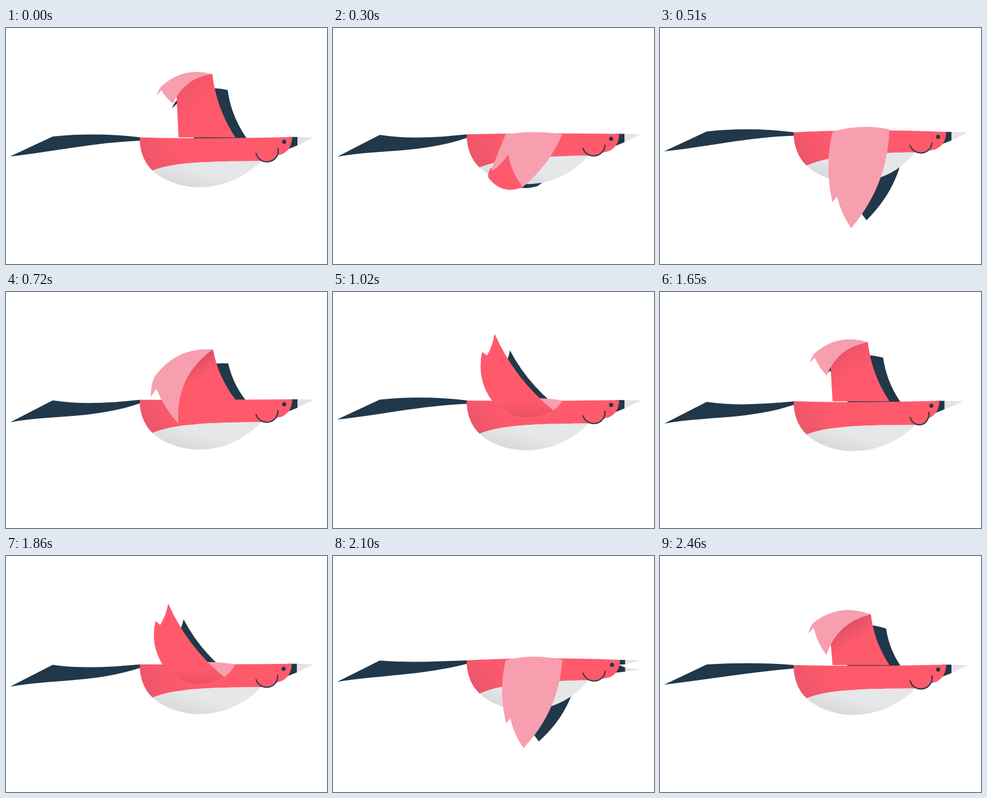
Write an HTML page that moves like this. It is 543x398 px and loops after 2.49 s.

```html
<!DOCTYPE html>
<html lang="en">
<head>
<meta charset="utf-8">
<title>Flying bird</title>
<style>
  html, body { margin: 0; width: 100%; height: 100%; overflow: hidden; background: #fff; }
  svg { display: block; width: 100%; height: 100%; }
  .red { fill: #ff5a6c; }
  .pale { fill: #f79fae; }
  .navy { fill: #21384a; }
  .beak { fill: #e4e2e8; }
</style>
</head>
<body>
<svg viewBox="0 0 543 398">
  <defs>
    <linearGradient id="rump" gradientUnits="userSpaceOnUse" x1="230" y1="52" x2="290" y2="14">
      <stop stop-color="#e9546a"/><stop offset="1" stop-color="#ff5a6c"/>
    </linearGradient>
    <linearGradient id="vent" gradientUnits="userSpaceOnUse" x1="318" y1="86" x2="326" y2="56">
      <stop stop-color="#d8d9dc"/><stop offset="1" stop-color="#e6e7e8"/>
    </linearGradient>
    <linearGradient id="fold" x1="0.1" y1="0" x2="0.5" y2="0.5">
      <stop offset="0.2" stop-color="#cc485e"/><stop offset="1" stop-color="#ff5a6c"/>
    </linearGradient>
    <linearGradient id="under" x1="0" y1="0" x2="0" y2="1">
      <stop offset="0.8" stop-color="#ff5a6c"/><stop offset="1" stop-color="#e94f64"/>
    </linearGradient>
  </defs>
  <g id="farWing" class="navy"><path id="farInner"/><path id="farOuter"/></g>
  <path id="tail" class="navy"/>
  <g id="bird">
    <path id="mask" class="navy"/>
    <path id="bill" class="beak"/>
    <path id="torso" fill="url(#rump)"/>
    <path id="belly" fill="url(#vent)"/>
    <path id="smile" class="red" stroke="#21384a" stroke-width="2" stroke-linecap="round"/>
    <circle id="eye" class="navy" r="3.5"/>
  </g>
  <path id="inner"/>
  <path id="innerShade" fill="url(#fold)"/>
  <path id="outer"/>
  <path id="outerShade" fill="url(#under)"/>
</svg>
<script>
const LOOP = 2490, BEAT = LOOP / 3, STEP = 30;
const TOP = 75;              // phase with the wing fully raised
const KEYS = 7, DOWN = 3;    // equal parts of a beat, and how many are downstroke

const el = {};
document.querySelectorAll('svg [id]').forEach(n => el[n.id] = n);
const set = (node, attrs) => { for (const k in attrs) node.setAttribute(k, attrs[k]); };

const mix = (a, b, k) => a + (b - a) * k;
const mixPt = (a, b, k) => [mix(a[0], b[0], k), mix(a[1], b[1], k)];
const clamp = v => Math.max(0, Math.min(1, v));
const ease = v => { v = clamp(v); return v * v * (3 - 2 * v); };
const bump = (t, mid, width) => Math.exp(-(((t - mid) / width) ** 2));

// point at place u on a polyline whose vertices are one unit of time apart
function follow(path, u) {
  const i = Math.min(Math.floor(u), path.length - 2);
  return mixPt(path[i], path[i + 1], u - i);
}

// closed outline of [point, bend] pairs; bend curves the edge to the next point
function outline(...edges) {
  let d = 'M' + edges[0][0];
  edges.forEach(([a, bend], i) => {
    const b = edges[(i + 1) % edges.length][0];
    const [mx, my] = mixPt(a, b, 0.5);
    d += `Q${mx + bend * (b[1] - a[1])} ${my - bend * (b[0] - a[0])} ${b}`;
  });
  return d + 'Z';
}

// both feather tips run round a closed track
const longTip = [[285, 28], [273, 72], [299, 229], [322, 322], [324, 345], [300, 251], [281, 185]];
const shortTip = [[266, 72], [252, 102], [270, 250], [293, 281], [291, 300], [242, 207], [249, 138]];
// the crease travels from the shoulder to the tips once per stroke
const frontDown = [[372, 200], [315, 276]], rearDown = [[268, 183], [262, 260]];
const frontUp = [[388, 168], [342, 88], [360, 108], [330, 26]];
const rearUp = [[292, 174], [245, 163], [259, 118], [268, 66]];

function drawWings(phase, y) {
  const u = (phase - TOP + BEAT) % BEAT / BEAT * KEYS;
  const down = u < DOWN;
  const tip = follow([...longTip, longTip[0]], u);
  const tip2 = follow([...shortTip, shortTip[0]], u);
  const rootF = [388, y], rootR = [292, y];
  const crease = (root, fall, rise, end) =>
    down ? follow([root, ...fall, end], u) : follow([root, ...rise], u - DOWN);
  const front = crease(rootF, frontDown, frontUp, tip);
  const rear = crease(rootR, rearDown, rearUp, tip2);

  // notch between the feathers, pulled towards the crease
  const base = mixPt(tip2, tip, 0.3);
  const span = Math.hypot(tip[0] - tip2[0], tip[1] - tip2[1]);
  const reach = Math.hypot(rear[0] - base[0], rear[1] - base[1]) || 1;
  const notch = mixPt(base, rear, Math.min(0.7, 0.42 * span / reach));

  const roll = down ? 0 : ease((u - DOWN - 0.6) / 1.4);
  const lead = down ? 0.12 : mix(0.18, -0.28, roll);
  const ridge = down ? -0.38 : mix(0.12, 0.28, roll);
  const corner = down ? rear : mixPt(rootR, [288, mix(front[1], tip[1], 0.55)], roll);

  const inner = outline([rootR, 0], [corner, down ? ridge : 0.32 * roll], [front, -0.12], [rootF, down ? -0.08 : 0]);
  const outer = outline([front, lead], [tip, 0.1], [notch, 0], [tip2, down ? -0.22 : 0.12], [rear, ridge]);
  const folded = roll * clamp((6.5 - u) * 2);
  const cupped = down ? clamp(1 - Math.abs(u - 1) * 1.3) : 0;

  set(el.inner, { d: inner, class: down ? 'pale' : 'red' });
  set(el.outer, { d: outer, class: down ? 'red' : 'pale' });
  set(el.innerShade, { d: inner, opacity: folded });
  set(el.outerShade, { d: outer, opacity: cupped });
  set(el.farInner, { d: inner });
  set(el.farOuter, { d: outer });
  set(el.farWing, { transform: `matrix(1 0 0 0.85 26 ${0.15 * y + 11})` });
}

function drawTail(t, y) {
  const wave = ((1 + Math.cos(2 * Math.PI * (t - 10) / (LOOP / 5))) / 2) ** 3;
  const h = (rest, swing) => y + rest - swing * wave;
  set(el.tail, { d: `M228 ${y}C178 ${h(5, 11)} 130 ${h(9, 16)} 79 ${h(1, 2.5)}` +
    `L7 ${h(38, 6)}C75 ${h(25, 0)} 150 ${h(33, 25)} 228 ${y + 5.5}Z` });
}

function drawBody(t, y, sway) {
  const nod = bump(t, 1650, 130);
  const open = ease((t - 1930) / 80) * ease((2280 - t) / 80);
  const dx = 1.5 * open - 11.5 * nod;
  const x = v => v + dx;
  const gap = 5.5 * open, chin = 37 + 0.7 * sway, end = 460 + dx * 0.45;
  const billX = 521 + dx * 0.7;
  set(el.bird, { transform: `translate(0 ${y})` });
  set(el.torso, { d: `M226 0Q345 ${sway * 1.1 - 1.5} ${x(484)} -0.8C${x(484)} 17 ${x(474)} 28 ${x(460)} 30` +
    `L432 ${chin}C330 ${chin} 280 43 248 56C233 42 226 22 226 0Z` });
  set(el.belly, { d: `M248 56C280 43 330 ${chin} 432 ${chin}C405 66 370 84 325 84C293 84 262 70 248 56Z` });
  set(el.mask, { d: `M${x(478)} -0.8H${x(493)}V6.5L${x(481)} 7.5L${x(493)} ${6.5 + gap}V${13.5 + gap}L${x(474)} 21Z` });
  set(el.bill, { d: `M${x(493)} -0.8L${billX} 0L${x(493)} 6.5Z` +
    `M${x(493)} ${mix(-0.8, 12, open)}L${billX} ${15.5 * open}L${x(493)} ${13.5 + gap}Z` });
  set(el.smile, { d: `M423 ${24.5 + 0.6 * sway}A${(end - 422) / 2} 18.6 0 0 0 ${end} 18.3` });
  set(el.eye, { cx: x(470.5), cy: 7.5 });
}

function draw(ms) {
  const t = Math.floor((ms % LOOP) / STEP + 1e-6) * STEP;
  const phase = t % BEAT;
  const sway = 4.6 * Math.cos(2 * Math.PI * (phase - 60) / BEAT);
  const y = 180.4 + sway;
  drawTail(t, y);
  drawBody(t, y, sway);
  drawWings(phase, y);
}

let start;
function tick(now) {
  if (start === undefined) start = now;
  draw(Math.max(0, now - start));
  requestAnimationFrame(tick);
}
draw(0);
requestAnimationFrame(tick);
</script>
</body>
</html>
```
